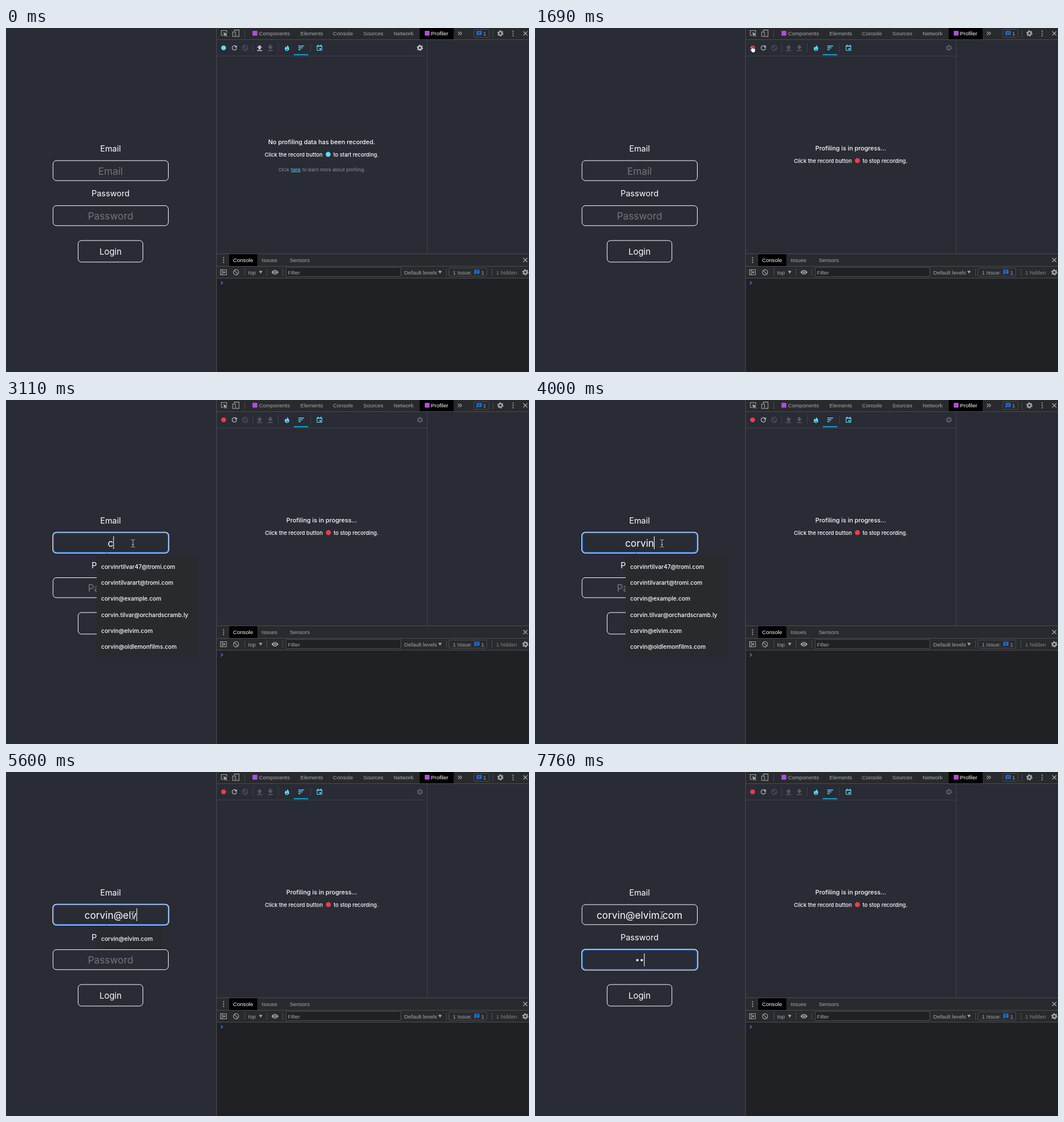
An HTML page that plays this animation: 923 px wide and 607 px high, repeating every 8000 ms.

```html
<!DOCTYPE html>
<html lang="en">
<head>
<meta charset="utf-8">
<title>Login form profiling</title>
<style>
  html, body { margin: 0; width: 100%; height: 100%; overflow: hidden; background: #292c35; }
  svg { display: block; width: 100vw; height: 100vh; }
  text { font-family: Inter, "Open Sans", sans-serif; fill: #fff; white-space: pre; }
  .mid { text-anchor: middle; }
  .label { font-size: 14.5px; }
  .field { font-size: 17.3px; }
  .hint { fill: #757575; }
  .head { font-size: 10.8px; font-weight: 500; }
  .body { font-size: 9.35px; font-weight: 500; }
  .small { font-size: 7.9px; fill: #8f949d; letter-spacing: .1px; }
  .option { font-size: 10.2px; font-weight: 500; }
  .ui { font-family: "Liberation Sans", Arial, sans-serif; font-size: 9.65px; fill: #a3a7ac; }
  .on { fill: #fff; }
  .dim { fill: #80858b; }
  .line { stroke: #494c50; fill: none; }
  .box { fill: none; stroke: #fff; }
  .icon { fill: none; stroke: #a3a7ac; stroke-width: 1.1; }
</style>
</head>
<body>
<svg viewBox="0 0 923 607" xmlns="http://www.w3.org/2000/svg">
  <defs>
    <g id="gear">
      <circle r="3.1" fill="none" stroke="currentColor" stroke-width="2.4"/>
      <circle r="4.6" fill="none" stroke="currentColor" stroke-width="1.7" stroke-dasharray="2.4 2.417"/>
    </g>
    <g id="kebab" fill="#a3a7ac"><circle cy="-4" r="1.1"/><circle r="1.1"/><circle cy="4" r="1.1"/></g>
    <path id="close" d="M-3.6-3.6L3.6 3.6M3.6-3.6L-3.6 3.6" stroke="#b4b8bc" stroke-width="1.3"/>
    <g id="note">
      <path d="M0 0h9v7h-7l-2 2z" fill="#1a73e8"/>
      <path d="M2 2.3h5M2 4.6h4" stroke="#202124" stroke-width=".9"/>
    </g>
    <g id="ban" fill="none" stroke="currentColor" stroke-width="1.2"><circle r="4.6"/><path d="M-3.2-3.2L3.2 3.2"/></g>
    <path id="caretDown" d="M0 0h6l-3 5z" fill="#a3a7ac"/>
  </defs>

  <rect width="923" height="607" fill="#292c35"/>

  <!-- login form -->
  <text class="label mid" x="184.5" y="217.5">Email</text>
  <text class="label mid" x="184.5" y="297.2">Password</text>
  <rect class="box" x="83" y="234" width="203.5" height="35.3" rx="6"/>
  <rect class="box" x="83" y="313.5" width="203.5" height="35.3" rx="6"/>
  <rect class="box" x="127.3" y="375" width="114.3" height="38" rx="6"/>
  <text class="mid" font-size="14.9" x="184.5" y="399.8">Login</text>
  <g id="ring" fill="none">
    <rect x="83.8" y="234.6" width="202.2" height="34.2" rx="5.5" stroke="#1a66cc" stroke-width="1.8"/>
    <rect x="82.5" y="233.2" width="204.9" height="37" rx="6.5" stroke="#fff" stroke-width="1.1"/>
  </g>
  <text id="email" class="field mid" x="184.5" y="258.5"></text>
  <text id="passHint" class="field hint mid" x="184.5" y="338">Password</text>
  <g id="dots" fill="#fff"></g>
  <path id="caret" d="M0 0v22.5" stroke="#fff" stroke-width="1.1"/>

  <!-- devtools -->
  <rect x="371" width="552" height="21" fill="#292a2d"/>
  <rect x="371" y="399" width="552" height="43" fill="#292a2d"/>
  <rect x="371" y="442" width="552" height="165" fill="#202124"/>
  <rect x="730" width="60" height="20" fill="#000"/>
  <rect x="394" y="399" width="49.5" height="21" fill="#000"/>
  <path class="line" d="M371.5 0V607M371 20.5H923M371 398.5H923M371 420.5H923M371 441.5H923"/>
  <path d="M372 49.5H743.5M743.5 21V398" fill="none" stroke="#3d424a"/>
  <path class="line" d="M421.5 3.5v13M859.5 3.5v13M421.5 424.5v13M460.5 424.5v13M488.5 424.5v13M777.5 424.5v13M857.5 424.5v13"/>
  <path d="M435.5 27v16M480.5 27v16M537.5 27v16" stroke="#3d424a"/>

  <path class="icon" d="M384 13h-4V4.5h9.5v4"/>
  <path d="M383.5 7.500l7.500 3-3 1.200 2.500 2.600-1 1-2.600-2.500-1.200 2.600z" fill="#a3a7ac"/>
  <path class="icon" d="M403 6V3.600h8.200v11.300h-5M400 7h5v8h-5z"/>
  <rect x="435" y="5" width="8.500" height="8.500" rx="1.200" fill="#b04fd6"/>
  <rect x="739" y="5" width="8.500" height="8.500" rx="1.200" fill="#b04fd6"/>
  <path class="icon" d="M797.500 6.500l3 3-3 3M801.200 6.500l3 3-3 3"/>
  <rect class="line" x="825.500" y="2.500" width="27" height="14" rx="2"/>
  <use href="#note" x="830.500" y="5.300"/>
  <use href="#gear" x="872.500" y="9.500" color="#a3a7ac"/>
  <use href="#kebab" x="895" y="9.700"/>
  <use href="#close" x="916.500" y="9.500"/>

  <!-- profiler toolbar -->
  <circle id="record" cx="384" cy="35" r="4.300"/>
  <path d="M406.300 32.800a3.900 3.900 0 1 0 .6 2.800" fill="none" stroke="#c2c5ca" stroke-width="1.200"/>
  <path d="M407.500 30.500v4h-4z" fill="#c2c5ca"/>
  <use href="#ban" x="422" y="35" color="#555a63"/>
  <path id="upload" d="M447.500 30l4.600 4.700h-2.800v3.300h-3.600v-3.300h-2.800zM443 39h9v1.500h-9z"/>
  <path d="M466.500 38l4.600-4.700h-2.800v-3.300h-3.600v3.300h-2.800zM462 39h9v1.500h-9z" fill="#555a63"/>
  <path d="M496.500 29.800c.3 2.300 3.200 3.200 3.200 6.400 0 2.700-1.800 4.300-3.900 4.300s-3.800-1.600-3.800-4c0-1.900 1-2.900 1.800-3.900.1 1.100.7 1.700 1.300 1.700 1.100 0 .8-2.700 1.400-4.500z" fill="#61dafb"/>
  <path d="M496 36.500c1.300 1 1.500 2.800 0 2.800s-1.700-1.500 0-2.800z" fill="#292c35"/>
  <path d="M516 31.800h10M516 35h7.200M516 38.200h4" stroke="#61dafb" stroke-width="1.600"/>
  <rect x="508" y="46" width="25.500" height="2.200" fill="#1799c4"/>
  <path d="M549 31.500h8.500v8h-8.500z" fill="none" stroke="#61dafb" stroke-width="1.100"/>
  <path d="M548.500 32h9.500M550.800 29.500v2M555.700 29.500v2" stroke="#61dafb" stroke-width="1.500"/>
  <rect x="553.300" y="35.500" width="2.700" height="2.700" fill="#61dafb"/>
  <use id="settings" href="#gear" x="730.500" y="35"/>

  <!-- profiler messages -->
  <g id="idle">
    <text class="head mid" x="557" y="204.700">No profiling data has been recorded.</text>
    <text class="body" x="456.500" y="226.600">Click the record button</text>
    <circle cx="568.500" cy="223" r="4.400" fill="#61dafb"/>
    <text class="body" x="577.700" y="226.600">to start recording.</text>
    <text class="small" x="481" y="252.500">Click</text>
    <text class="small" x="502.800" y="252.500" style="fill:#61dafb" text-decoration="underline">here</text>
    <text class="small" x="523" y="252.500">to learn more about profiling.</text>
  </g>
  <g id="busy">
    <text class="head mid" x="557.200" y="215.800">Profiling is in progress...</text>
    <text class="body" x="457" y="237.600">Click the record button</text>
    <circle cx="569" cy="234" r="4.400" fill="#fc3a4b"/>
    <text class="body" x="578.200" y="237.600">to stop recording.</text>
  </g>

  <!-- console drawer -->
  <use href="#kebab" x="384" y="409.700"/>
  <use href="#close" x="916.500" y="409.500"/>
  <path class="icon" d="M378.500 426.500h10.500v9h-10.500zM381.500 426.500v9"/>
  <path d="M383.500 428.500l4 2.500-4 2.500z" fill="#a3a7ac"/>
  <use href="#ban" x="406" y="431" color="#a3a7ac"/>
  <use href="#caretDown" x="446.500" y="428.500"/>
  <path d="M468.500 431q6-8 12.500 0q-6.500 8-12.500 0z" fill="#a3a7ac"/>
  <circle cx="474.800" cy="431" r="2.200" fill="#a3a7ac" stroke="#292a2d" stroke-width="1.100"/>
  <rect x="494.500" y="422.500" width="202" height="16" fill="#202124" stroke="#494c50"/>
  <use href="#caretDown" x="763" y="428.500"/>
  <rect class="line" x="781.500" y="423.500" width="67" height="14.500" rx="2"/>
  <use href="#note" x="826.500" y="426.500"/>
  <use href="#gear" x="916.500" y="431" color="#a3a7ac"/>
  <path d="M379.200 447l3.200 2.800-3.200 2.800" fill="none" stroke="#3b82e8" stroke-width="1.300"/>
  <g id="labels"></g>

  <!-- suggestions -->
  <g id="popup">
    <path d="M171.500 275l6-5 6 5z" fill="#2a2c2f"/>
    <rect id="popupBox" x="160" y="274.500" rx="2.500" fill="#292a2d"/>
    <g id="options"></g>
  </g>

  <!-- pointers -->
  <g id="pointer">
    <path id="arrow" d="M0 0v11.200l2.600-2.400 1.700 4 1.900-.8-1.700-3.900h3.600z" fill="#000" stroke="#fff" stroke-width=".9"/>
    <path id="hand" d="M-1.100 6.200V1.100c0-1.400 2-1.400 2 0v2.900c.6-.6 1.600-.5 1.800.3.700-.5 1.500-.2 1.700.5.800-.4 1.500.1 1.500.9v2.200c0 1.500-1 2.200-1.200 3.700h-4.700c-.4-1.700-2-2.700-3.200-4.700-.6-1.100.9-1.900 2.100-.7z" fill="#fff" stroke="#000" stroke-width=".8"/>
    <g id="beam" fill="none">
      <path id="beamShape" d="M-3.300-6.600q2.800 0 3.300 1.300q.5-1.300 3.300-1.300M-3.300 6.600q2.800 0 3.300-1.300q.5 1.300 3.300 1.300M0-5.300v10.600M-1.600 2h3.200" stroke="#ddd"/>
    </g>
  </g>
</svg>
<script>
const LOOP = 8000, STEP = 88.5, MID = 184.5;
const ADDRESS = 'corvin@elvim.com';
const KEYS = [3110, 3290, 3550, 3820, 3910, 4000, 4440, 5250,
  5340, 5520, 5610, 5690, 5960, 6140, 6230, 6320];
const DOTS = [7580, 7760];
const SAVED = [
  'corvinrtilvar47@tromi.com', 'corvintilvarart@tromi.com', 'corvin@example.com',
  'corvin.tilvar@orchardscramb.ly', 'corvin@elvim.com', 'corvin@oldlemonfilms.com'
];
const RECENT = [4, 2, 0, 5, 1, 3].map(i => SAVED[i]);
const START = 620, RECORD = 1690, LEAVE = 1960, FOCUS = 2570, OPEN = 2660, TAB = 6500;

const el = id => document.getElementById(id);
const set = (id, name, value) => el(id).setAttribute(name, value);
const show = (id, on) => set(id, 'display', on ? 'inline' : 'none');
const move = (id, x, y) => set(id, 'transform', `translate(${x} ${y})`);
const mix = (a, b, p) => a + (b - a) * p;
const within = (t, a, b) => t >= a && t < b;
const countPast = (times, t) => times.filter(k => t >= k).length;
const stepsSince = (t, start) => Math.floor((t - start) / STEP + .05);

const LABELS = [
  ['Components', 446.5, 13], ['Elements', 519.5, 13], ['Console', 577, 13], ['Sources', 630.5, 13],
  ['Network', 684, 13], ['Profiler', 750, 13, 'on'], ['1', 842, 13],
  ['Console', 400.7, 413, 'on'], ['Issues', 451, 413], ['Sensors', 500.7, 413],
  ['top', 427.5, 434.5], ['Filter', 497.5, 434.5], ['Default levels', 702.7, 434.5],
  ['1 Issue:', 788.5, 434.5], ['1', 838.5, 434.5], ['1 hidden', 865, 434.5, 'dim']
];
el('labels').innerHTML = LABELS.map(([s, x, y, tone = '']) =>
  `<text class="ui ${tone}" x="${x}" y="${y}">${s}</text>`).join('');

// Dark outline behind the text pointer.
const outline = el('beamShape').cloneNode();
outline.removeAttribute('id');
outline.setAttribute('stroke', '#111');
outline.setAttribute('stroke-width', 2.3);
el('beam').prepend(outline);

function drawPointer(t) {
  let x, y;
  if (t < LEAVE) {
    const u = Math.min(1, stepsSince(t, START) / 8);
    const p = 1 - Math.pow(1 - u, 1.75);
    x = mix(463, 383, p);
    y = mix(85, 31.8, p);
  } else {
    const u = Math.min(1, (stepsSince(t, LEAVE) + 1) / 7);
    const p = u * u * (3 - 2 * u);
    x = mix(383, 224, p);
    y = mix(31.8, 253, p);
  }
  const inField = x < 287 && y > 234;
  const onBar = y < 46;
  show('pointer', t >= START);
  show('beam', inField);
  show('hand', onBar);
  show('arrow', !inField && !onBar);
  move('pointer', x, y);
}

function drawPopup(t, typed) {
  const list = t < KEYS[0] ? RECENT : SAVED.filter(s => s.startsWith(typed));
  const open = t >= OPEN && typed !== ADDRESS;
  show('popup', open);
  if (!open) return;
  const rows = el('options');
  rows.innerHTML = list.map((s, i) =>
    `<text class="option" x="168" y="${297.6 + i * 28.35}">${s}</text>`).join('');
  const wide = Math.max(...[...rows.children].map(r => r.getComputedTextLength()));
  set('popupBox', 'width', wide + 25);
  set('popupBox', 'height', 9.2 + list.length * 28.35);
}

function drawForm(t) {
  const typed = ADDRESS.slice(0, countPast(KEYS, t));
  const email = el('email');
  email.textContent = typed || 'Email';
  set('email', 'class', 'field mid' + (typed ? '' : ' hint'));

  const n = countPast(DOTS, t);
  show('passHint', !n);
  el('dots').innerHTML = Array.from({ length: n }, (_, i) =>
    `<circle cx="${MID + (i - (n - 1) / 2) * 7.7}" cy="332" r="2.1"/>`).join('');

  const onPass = t >= TAB;
  show('ring', t >= FOCUS);
  move('ring', 0, onPass ? 79.5 : 0);
  show('caret', t >= FOCUS && !within(t, 4980, 5250) && !within(t, 7040, 7490));
  const width = onPass ? n * 8 : typed ? email.getComputedTextLength() : 0;
  move('caret', MID + width / 2 + .4, onPass ? 320.3 : 240.5);
  drawPopup(t, typed);
}

function drawPanel(t) {
  const busy = t >= RECORD;
  const tool = busy ? '#555a63' : '#c2c5ca';
  show('idle', !busy);
  show('busy', busy);
  set('record', 'fill', busy ? '#fc3a4b' : '#61dafb');
  set('upload', 'fill', tool);
  set('settings', 'color', tool);
}

function draw(t) {
  drawPanel(t);
  drawForm(t);
  drawPointer(t);
}

const begin = performance.now();
function tick() {
  draw((performance.now() - begin) % LOOP);
  requestAnimationFrame(tick);
}
tick();
</script>
</body>
</html>
```
